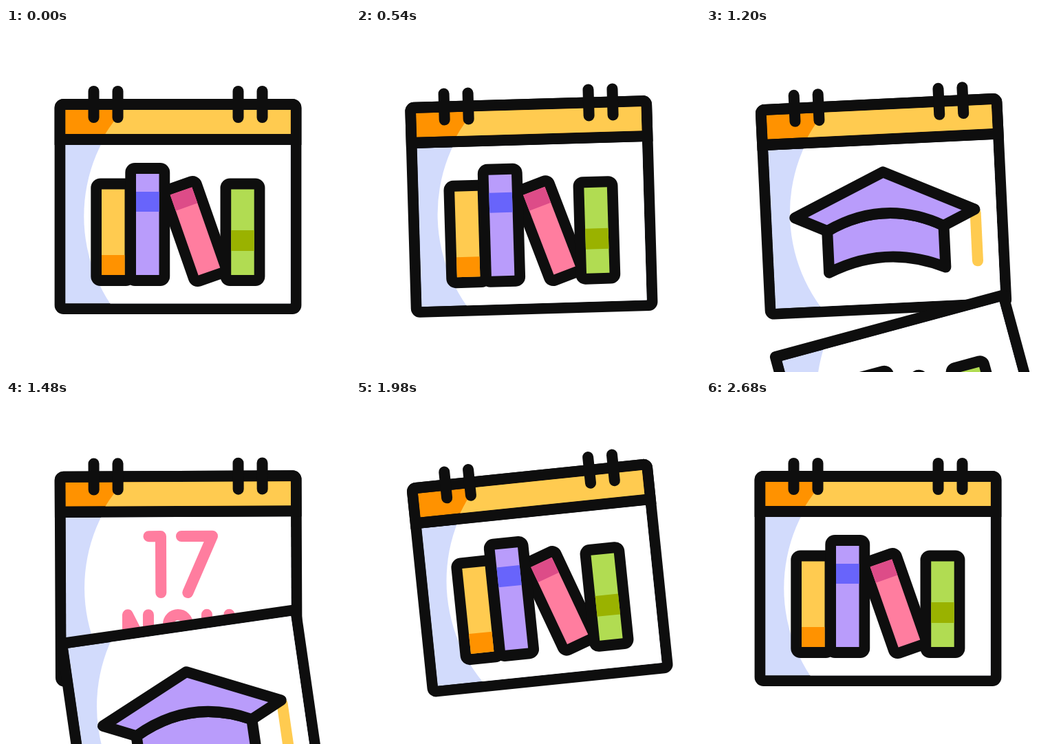
These frames come from a looping animation (500x500 px, 3 s). An HTML page with a canvas:

```html
<!DOCTYPE html>
<html lang="en">
<head>
<meta charset="utf-8">
<title>Calendar</title>
<style>
  html, body { margin: 0; width: 100%; height: 100%; overflow: hidden; background: #fff; }
  canvas { display: block; width: 100%; height: 100%; }
</style>
</head>
<body>
<canvas id="stage" width="500" height="500"></canvas>
<script>
const ctx = document.getElementById('stage').getContext('2d');
const LOOP = 3000;
const INK = '#0e0e0e', WHITE = '#ffffff', SHADE = '#d2dbfc';
const YELLOW = '#ffcb50', ORANGE = '#ff9200', PINK = '#ff7d9f', ROSE = '#dd4c88';
const PURPLE = '#b99cfb', INDIGO = '#6864fb', GREEN = '#b1dc52', OLIVE = '#9ab200';

// Swing of the whole calendar: [time, degrees]
const SWING = [[0, 0], [333, 6], [683, -6], [1011, 6], [1300, -6],
               [1672, 6], [2000, -6], [2337, 6], [2672, 0]];
const PIVOT = { x: 250, y: 91 };
const PAGE_TOP = 143;
const FALL = { start: 1000, step: 332.5, time: 333, drop: 445, turn: -19 };

const smooth = p => p * p * (3 - 2 * p);
const clamp = p => Math.min(1, Math.max(0, p));

function swingAt(t) {
  for (let i = 1; i < SWING.length; i++) {
    const [t0, a] = SWING[i - 1], [t1, b] = SWING[i];
    if (t < t1) return a + (b - a) * smooth((t - t0) / (t1 - t0));
  }
  return 0;
}

function rotateAbout(x, y, degrees) {
  ctx.translate(x, y);
  ctx.rotate(degrees * Math.PI / 180);
  ctx.translate(-x, -y);
}

function box(x0, y0, x1, y1, color, radius = 0) {
  ctx.fillStyle = color;
  ctx.beginPath();
  ctx.roundRect(x0, y0, x1 - x0, y1 - y0, radius);
  ctx.fill();
}

function stroke(color, width = 16) {
  ctx.strokeStyle = color;
  ctx.lineWidth = width;
  ctx.lineCap = ctx.lineJoin = 'round';
  ctx.stroke();
}

function line(points, color) {
  ctx.beginPath();
  points.forEach(([x, y]) => ctx.lineTo(x, y));
  stroke(color);
}

// A panel whose left part lies outside a large light circle
function shadedPanel(top, bottom, dark, light, circleX = 344.3) {
  ctx.save();
  ctx.beginPath();
  ctx.rect(86.3, top, 327.4, bottom - top);
  ctx.clip();
  box(86, top, 414, bottom, dark);
  ctx.fillStyle = light;
  ctx.beginPath();
  ctx.arc(circleX, 273.5, 231, 0, Math.PI * 2);
  ctx.fill();
  ctx.restore();
}

function book(x, top, color, bandTop, bandBottom, bandColor, bottom = 359) {
  const right = x + 33.5;
  box(x - 15.7, top - 16, right + 15.7, bottom + 16, INK, 14);
  box(x, top, right, bottom, color);
  box(x, bandTop, right, bandBottom, bandColor);
}

function books() {
  book(139, 234.5, YELLOW, 330, 359, ORANGE);
  ctx.save();
  rotateAbout(275, 295.5, -19.3);
  book(258.2, 233.5, PINK, 233.5, 258, ROSE, 357.5);
  ctx.restore();
  book(189, 212, PURPLE, 238, 267, INDIGO);
  book(327.2, 234.5, GREEN, 294, 324, OLIVE);
}

function cap() {
  line([[383, 275], [383, 345]], YELLOW);

  ctx.beginPath();
  ctx.moveTo(166.5, 291.5);
  ctx.quadraticCurveTo(251.5, 247.5, 336, 291.5);
  ctx.lineTo(336, 352);
  ctx.quadraticCurveTo(251.5, 314, 166.5, 352);
  ctx.closePath();
  ctx.fillStyle = PURPLE;
  ctx.fill();
  stroke(INK);

  ctx.beginPath();
  ctx.moveTo(251.5, 209.5);
  ctx.lineTo(382, 270);
  ctx.lineTo(336, 291.5);
  ctx.quadraticCurveTo(251.5, 247.5, 166.5, 291.5);
  ctx.lineTo(120.5, 270);
  ctx.closePath();
  ctx.fill();
  stroke(INK);
}

function dateText() {
  line([[207, 198], [224.5, 198], [224.5, 280]], PINK);
  line([[254.5, 198], [299.5, 198], [263.5, 280]], PINK);
  line([[176, 371.5], [176, 312], [206, 371.5], [206, 312]], PINK);
  ctx.beginPath();
  ctx.roundRect(235, 312, 28, 59.5, 14);
  stroke(PINK);
  line([[291, 312], [291, 353], [307.5, 371.5], [323.5, 353], [323.5, 312]], PINK);
}

const pages = [books, cap, dateText, books];

function page(index, top) {
  shadedPanel(top, 400.5, SHADE, WHITE);
  pages[index]();
}

function fallingPage(index, amount) {
  ctx.save();
  ctx.translate(0, FALL.drop * amount);
  rotateAbout(250, PAGE_TOP, FALL.turn * amount);
  box(70.6, PAGE_TOP - 8, 429.4, 416, INK, [8, 8, 13, 13]);
  page(index, PAGE_TOP + 8);
  ctx.restore();
}

function header() {
  box(70.6, 103, 429.4, 170, INK, [13, 13, 0, 0]);
  shadedPanel(119, 154, ORANGE, YELLOW, 342);
  for (const x of [127.5, 162.5, 337.5, 372.5]) line([[x, 92], [x, 130]], INK);
}

function draw(t) {
  ctx.fillStyle = WHITE;
  ctx.fillRect(0, 0, 500, 500);
  ctx.save();
  rotateAbout(PIVOT.x, PIVOT.y, swingAt(t));

  const falls = [0, 1, 2].map(i => clamp((t - FALL.start - i * FALL.step) / FALL.time));
  const started = falls.filter(p => p > 0).length;
  box(70.6, 103, 429.4, 416, INK, 13);
  page(started, 170);
  for (let i = started - 1; i >= 0; i--) {
    if (falls[i] < 1) fallingPage(i, smooth(falls[i]));
  }
  header();
  ctx.restore();
}

function tick() {
  draw(performance.now() % LOOP);
  requestAnimationFrame(tick);
}
tick();
</script>
</body>
</html>
```
